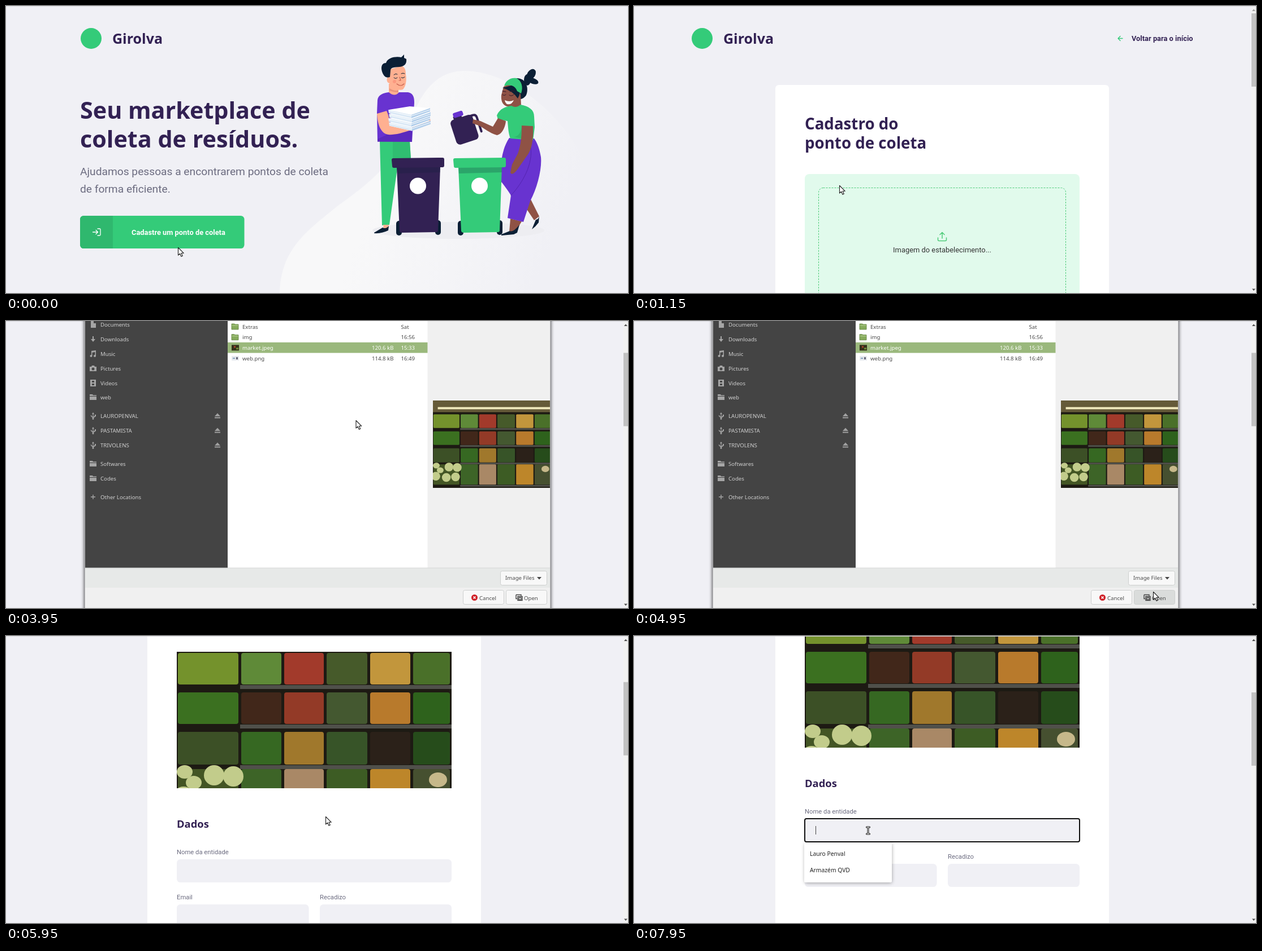
These frames come from a looping animation (1100 px wide and 509 px high, 8000 ms). An HTML page:

```html
<!DOCTYPE html>
<html lang="pt">
<head>
<meta charset="utf-8">
<title>Cadastro de ponto de coleta</title>
<style>
html, body { margin: 0; width: 100%; height: 100%; overflow: hidden; background: #f0f0f5; }
#stage { display: block; font-family: Roboto, sans-serif; }
.head { font-family: "Open Sans", sans-serif; font-weight: 700; fill: #322153; }
.ui { font-family: "Noto Sans", sans-serif; font-size: 9.65px; fill: #4a4a4a; }
.bold { font-weight: 700; }
.label { font-size: 11.25px; fill: #6c6c80; }
.line { fill: none; stroke-linecap: round; stroke-linejoin: round; }
.navy { fill: #0b1f35; } .dark { fill: #322153; } .green { fill: #34cb79; } .shade { fill: #2fb86e; }
.purple { fill: #6833d0; } .skin { fill: #ffb091; } .brown { fill: #8f5245; } .field { fill: #f0f0f5; }
</style>
</head>
<body>
<svg id="stage" width="1100" height="509" viewBox="0 0 1100 509">
<defs>
  <linearGradient id="fade" gradientUnits="userSpaceOnUse" x1="690" y1="240" x2="990" y2="360">
    <stop offset="0" stop-color="#f8f8f9"/><stop offset=".55" stop-color="#f4f4f7"/><stop offset="1" stop-color="#f0f0f5"/>
  </linearGradient>
  <filter id="soft" x="-10%" y="-10%" width="120%" height="120%"><feGaussianBlur stdDeviation="3"/></filter>
  <g id="photo"></g>
  <g id="bin">
    <rect x="8" y="112" width="10" height="26" rx="5" class="navy"/><rect x="77" y="111" width="10" height="26" rx="5" class="navy"/>
    <path d="M9 17L86 16L82 129Q82 132 79 132L18 133Q15 133 14 130Z"/>
    <path d="M9 17L86 16V26L10 28Z" fill="#0b1f35" fill-opacity=".22"/>
    <path d="M3 1L90 0Q93 0 93 3V14Q93 17 90 17L4 18Q1 18 1 15L0 4Q0 1 3 1Z"/>
    <circle cx="46.5" cy="50" r="14.5" fill="#fff"/>
  </g>
</defs>

<rect width="1100" height="509" class="field"/>

<g id="home">
  <path d="M484 509C486 432 530 400 590 352C660 302 690 270 715 205C735 150 762 115 812 115C880 116 960 170 1010 250C1050 320 1050 420 1030 509Z" fill="url(#fade)"/>
  <ellipse cx="800" cy="398" rx="152" ry="15" fill="#ededf1"/>
  <circle cx="150.5" cy="57.5" r="18.5" class="green"/>
  <text x="188" y="67" class="head" font-size="25">Girolva</text>
  <g class="head" font-size="41.3"><text x="131" y="200">Seu marketplace de</text><text x="131" y="251">coleta de resíduos.</text></g>
  <g font-size="19.2" fill="#6c6c80"><text x="131" y="300">Ajudamos pessoas a encontrarem pontos de coleta</text><text x="131" y="331">de forma eficiente.</text></g>
  <rect x="131" y="372" width="290.5" height="58" rx="6.4" class="green"/>
  <path d="M189 372H137.4A6.4 6.4 0 0 0 131 378.4V423.6A6.4 6.4 0 0 0 137.4 430H189Z" class="shade"/>
  <path class="line" stroke="#fff" stroke-width="1.3" d="M162 395H165.5Q167 395 167 396.5V405.5Q167 407 165.5 407H162M159 397.5L162.5 401L159 404.5M153.5 401H162.5"/>
  <text x="222" y="405.5" font-size="12.85" class="bold" fill="#fff">Cadastre um ponto de coleta</text>

  <!-- man -->
  <path class="green" d="M661 239H714L716 272L692 288L678 388L665 389Z"/>
  <path class="shade" d="M684 240H714L716 270H684Z" opacity=".7"/>
  <path class="skin" d="M667 388H677L676 394L668 396Z"/>
  <path class="navy" d="M651 402L666 393Q672 396 677 390L676 398Q664 404 651 403Z"/>
  <path class="skin" d="M677 138H694V156Q686 162 677 155Z"/>
  <path fill="#e8957c" d="M678 146Q688 152 694 149V153Q685 153 678 150Z"/>
  <path class="purple" d="M656 190L657 167C658 157 668 154 677 153C684 159 690 159 695 153L711 153C721 155 722 163 722 172L718 241L657 240Z"/>
  <path fill="#5626b5" d="M678 180L680 209L718 214V241H657V236L672 229Z" opacity=".7"/>
  <path class="skin" d="M676 113L700 106C706 109 707 114 707 121C709 132 707 143 702 148C692 151 681 146 678 137C672 136 672 125 678 125Z"/>
  <path class="navy" d="M669 124C662 114 662 101 672 101C675 91 690 89 699 91L704 86V92L708 94C709 102 705 107 696 108C687 109 681 108 680 114L679 126Q672 128 669 124Z"/>
  <path class="line" stroke="#0b1f35" d="M686 127Q689 130 692 127M699 127Q702 129 705 126M686 122Q689 119 692 121M699 120Q702 118 705 120"/>
  <path class="line" stroke="#c25b4c" stroke-width="1.1" d="M691 138Q698 144 704 138M696 126L698 132H695"/>
  <circle cx="687" cy="134" r="3" fill="#f98b75" opacity=".6"/>
  <path class="skin" d="M656 191L673 186C678 196 678 205 679 211L716 213L742 200L750 199L751 205L747 209L718 219C700 226 685 229 676 228C661 226 657 206 656 191Z"/>
  <g id="towels"></g>
  <!-- jug -->
  <g transform="rotate(-18 812 218)">
    <path class="line" stroke="#322153" stroke-width="4" d="M826 199H832Q838 199 838 205V231"/>
    <rect x="790" y="196" width="41" height="46" rx="7" class="dark"/>
    <rect x="798" y="191" width="15" height="6" class="dark"/><rect x="799" y="185" width="18" height="9" rx="3" class="purple"/>
  </g>
  <!-- woman -->
  <path class="brown" d="M928 343L943 373L934 380L918 356Z"/>
  <path class="navy" d="M930 396L937 379Q942 379 943 372L942 384Q937 391 930 396Z"/>
  <path class="brown" d="M892 377L912 382L902 399L890 401Z"/>
  <path class="navy" d="M876 405L891 399Q897 402 908 388L904 402L898 405L876 407Z"/>
  <path class="purple" d="M890 234C876 255 873 285 876 312C884 322 889 329 893 336L887 376L915 383L927 346C940 322 948 288 946 268C943 251 939 242 934 235Z"/>
  <path class="line" stroke="#5424b0" d="M928 250C932 280 915 312 893 336"/>
  <g class="navy">
    <ellipse cx="929" cy="121" rx="7" ry="10" transform="rotate(32 929 121)"/>
    <ellipse cx="932" cy="133" rx="10" ry="5" transform="rotate(20 932 133)"/>
    <ellipse cx="922" cy="131" rx="6" ry="10"/>
    <path d="M903 128C920 128 925 145 920 158C915 166 907 167 904 162Z"/>
  </g>
  <path class="brown" d="M895 164L910 156L911 177Q902 184 892 178Z"/>
  <path class="brown" d="M880 143C888 138 902 137 909 146C911 162 905 176 893 179C879 179 875 170 876 158Z"/>
  <path class="navy" d="M878 145C890 143 901 136 907 145Q911 155 905 164Q897 151 878 145Z"/>
  <path class="green" d="M881 142C883 133 892 126 903 128C912 133 915 144 911 155L904 151C900 140 890 139 881 142Z"/>
  <path class="line" stroke="#33182a" d="M878 157Q881 160 884 157M890 158Q894 161 898 157M878 151L884 152M891 152Q895 149 899 151"/>
  <path fill="#fff" d="M882 167Q890 171 898 167Q894 176 886 174Q883 172 882 167Z"/>
  <path class="green" d="M868 194C873 182 884 178 894 177Q902 182 910 175C925 178 934 184 934 196L935 215L932 238L892 235C888 224 888 214 887 204L870 201Z"/>
  <path class="brown" d="M870 199L884 204C883 215 877 228 868 229C856 226 846 217 836 212L825 208L826 201L839 204L861 214Z"/>
  <path class="shade" d="M898 232C908 232 912 220 912 211L916 236Z"/>
  <path class="brown" d="M912 212L932 213C933 236 930 255 921 266L905 289C899 298 893 300 892 295L895 281L905 262C911 245 912 230 912 212Z"/>
  <use href="#bin" x="682" y="269" class="dark"/>
  <use href="#bin" x="791" y="269" class="green"/>
</g>

<g id="form">
  <g id="page">
    <circle cx="120.5" cy="57.5" r="18.5" class="green"/>
    <text x="158" y="67" class="head" font-size="25">Girolva</text>
    <path class="line" stroke="#34cb79" stroke-width="1.3" d="M864 57.5H856M860 53.5L856 57.5L860 61.5"/>
    <text x="880" y="62" font-size="12.85" class="bold" fill="#322153">Voltar para o início</text>
    <rect x="250" y="140" width="590" height="900" rx="6.4" fill="#fff"/>
    <g class="head" font-size="27.7"><text x="302" y="219">Cadastro do</text><text x="302" y="253">ponto de coleta</text></g>
    <g id="drop">
      <rect x="302" y="298" width="486" height="242" rx="8" fill="#e1faec"/>
      <rect x="326.5" y="322.5" width="437" height="194" rx="8" fill="none" stroke="#4ecb79" stroke-dasharray="3 2"/>
      <path class="line" stroke="#4ecb79" stroke-width="1.5" d="M537.5 411V414.5Q537.5 416.5 539.5 416.5H550.5Q552.5 416.5 552.5 414.5V411M541 405.5L545 401.5L549 405.5M545 402V412"/>
      <text x="545" y="437" font-size="12.9" fill="#333" text-anchor="middle">Imagem do estabelecimento...</text>
    </g>
    <svg id="shot" x="302" y="298" width="486" height="242" viewBox="0 0 486 242"><use href="#photo"/></svg>
    <text x="302" y="610" class="head" font-size="18.4">Dados</text>
    <g class="label"><text x="302" y="657">Nome da entidade</text><text x="302" y="737">Email</text><text x="555" y="737">Recadizo</text></g>
    <g class="field"><rect x="302" y="666" width="486" height="41" rx="6.4"/><rect x="302" y="746" width="233.5" height="41" rx="6.4"/><rect x="555" y="746" width="233" height="41" rx="6.4"/></g>
    <g id="focus">
      <rect x="302" y="666" width="486" height="41" rx="3" fill="none" stroke="#101010" stroke-width="2"/>
      <rect x="302" y="710" width="154" height="70" rx="3" opacity=".35" filter="url(#soft)"/>
      <rect x="301" y="708.5" width="155" height="70.5" rx="2" fill="#fff"/>
      <g class="ui" style="font-size:10.3px;fill:#222"><text x="311" y="732">Lauro Penval</text><text x="311" y="761">Armazém QVD</text></g>
      <rect id="caret" x="321" y="679" width="1" height="15" fill="#444"/>
    </g>
  </g>
  <rect x="1092" width="8" height="509" fill="#f1f1f1"/>
  <rect id="thumb" x="1092" y="13" width="8" height="130" fill="#c1c1c1"/>
  <path id="up" d="M1093 9L1096 5.5L1099 9Z" fill="#505050"/><path d="M1093 501.5L1096 505L1099 501.5Z" fill="#505050"/>
</g>
<rect width="1100" height="1" fill="#dcdce1"/>

<g id="dialog"></g>

<g id="cursor" class="line">
  <path id="arrow" fill="#fff" stroke="#1a1a1a" stroke-width="1.1" d="M.5 .5V14L3.6 11.2L5.9 16.3L8.2 15.3L6 10.3H10.3Z"/>
  <path id="hand" fill="#fff" stroke="#1a1a1a" stroke-width="1.1" d="M0 11V1.5Q0 0 1.3 0T2.6 1.5V7Q5 5.5 5.5 7.5Q8 6.5 8 8.5Q10 8 10 10V13Q9.5 15 8.5 17H1Q-1 14-4 11Q-4.5 9-2.5 9Z"/>
  <g id="beam"><path d="M-2.5-6H2.5M-2.5 6H2.5M0-6V6" stroke="#1a1a1a" stroke-width="3"/><path d="M-2.5-6H2.5M-2.5 6H2.5M0-6V6" stroke="#eee"/></g>
</g>
</svg>

<script>
const $ = id => document.getElementById(id);
const rect = (x, y, w, h, fill, more = '') => `<rect x="${x}" y="${y}" width="${w}" height="${h}" fill="${fill}" ${more}/>`;
const ui = (x, y, s, more = '') => `<text class="ui" x="${x}" y="${y}" ${more}>${s}</text>`;
const draw = (x, y, d, color, more = '') => `<path transform="translate(${x} ${y})" d="${d}" fill="${color}" ${more}/>`;

// Stack of folded towels, bottom one first
$('towels').innerHTML = [3, 2, 1, 0].map(i => `<g transform="translate(${i % 2} ${i * 7.5})">
  <path d="M677 184L714 178L750 181L717 193V199L677 190Z" fill="#fff"/>
  <path d="M676 184L717 193V199L677 190Z" fill="#dbe9f6"/>
  <path d="M717 193L750 181V187L717 199Z" fill="#b3cfeb"/>
  <path d="M677 186L717 195L750 184" fill="none" stroke="#fff"/></g>`).join('');

// Market shelves in flat tones
const cols = [0, 112, 188, 263, 340, 416, 486];
const shelves = [
  [2, 56, '#74922c #5f8a38 #a23a2b #465a2a #c2963c #4a7029'],
  [72, 56, '#3b7020 #41271a #933a27 #445830 #b87a2c #2e621c'],
  [142, 58, '#3c5026 #366822 #a0782c #375428 #2b2119 #264c1b'],
  [208, 84, '#435524 #3d6427 #a98866 #3d5c24 #bd862a #465030']
];
$('photo').innerHTML = rect(0, -55, 486, 360, '#1d1a13') + rect(0, -55, 486, 48, '#655a38') + rect(20, -28, 466, 9, '#f1e9bd') +
  shelves.map(([y, h, tones]) => tones.split(' ').map((c, i) =>
    rect(cols[i] + 2, y, cols[i + 1] - cols[i] - 5, h, c, 'rx="4"')).join('') +
    rect(cols[1], y + h + 1, 374, 7, '#50504a')).join('') +
  [[14, 213], [30, 232], [66, 219], [100, 221], [12, 257], [55, 262], [93, 260]].map(([x, y], i) =>
    `<ellipse cx="${x}" cy="${y}" rx="${i > 1 ? 18 : 14}" ry="${i > 1 ? 18 : 12}" fill="#c2cc8b"/>`).join('') +
  '<ellipse cx="462" cy="227" rx="16" ry="13" fill="#c6b88a"/>';

// File chooser
const icons = {
  doc: 'M-4-6H1L5-2V6H-4ZM1-6V-2H5',
  down: 'M-1-5H1V0H4L0 5L-4 0H-1Z',
  music: 'M-3-5L5-6V4A2 2 0 1 1 3.5 2V-3L-1.5-2V4A2 2 0 1 1-3 2Z',
  camera: 'M-6-3H-3L-2-5H2L3-3H6V5H-6ZM0-1.5A2.5 2.5 0 1 0 .01-1.5Z',
  film: 'M-5-6H5V6H-5ZM-2-4V-1H2V-4ZM-2 1V4H2V1Z',
  folder: 'M-6-5H-1L0-3.5H6V-2H-6ZM-6-1H6V5H-6Z',
  usb: 'M0-6L2-3H.6V2L3 0V-2H5V1L.6 4A1.5 1.5 0 1 1-.6 4L-4 1V-1H-3V0L-.6 2V-3H-2Z',
  plus: 'M-.7-4H.7V-.7H4V.7H.7V4H-.7V.7H-4V-.7H-.7Z'
};
const places = [
  ['doc', 'Documents', 6], ['down', 'Downloads', 32], ['music', 'Music', 58], ['camera', 'Pictures', 84],
  ['film', 'Videos', 110], ['folder', 'web', 135], ['usb', 'LAUROPENVAL', 168], ['usb', 'PASTAMISTA', 194],
  ['usb', 'TRIVOLENS', 220], ['folder', 'Softwares', 253], ['folder', 'Codes', 279], ['plus', 'Other Locations', 312]
];
const files = [['Extras', '', 'Sat'], ['img', '', '16:56'], ['market.jpeg', '120.6 kB', '15:33'], ['web.png', '114.8 kB', '16:49']];

const fileIcon = (i, y) => i < 2
  ? draw(405, y, 'M-6-5H-1L0-4H6V5H-6Z', '#86ab5c', 'stroke="#5f7f3d" stroke-width=".8"') + rect(399.5, y - 2.5, 11, 1, '#b8d196')
  : i < 3 ? rect(399, y - 5, 13, 10, '#33301b') + rect(403, y - 3, 3, 3, '#a5452b') + rect(407, y, 4, 3, '#6f8b36')
  : rect(399, y - 4, 13, 8, '#e6e9ee') + rect(401, y - 1, 4, 2, '#8aa6c0') + rect(407, y - 2, 3, 4, '#667');

const list = (id, chosen, edge) => `<g id="${id}">` + rect(392, 0, edge - 392, 438, '#fff') + files.map(([name, size, date], i) => {
  const y = 10 + 18.7 * i, tint = i === chosen ? 'style="fill:#fff"' : '';
  return (tint && rect(392, y - 9.5, edge - 392, 18.7, '#9ab87c')) + fileIcon(i, y) + ui(418, y + 3.5, name, tint) +
    ui(edge - 60, y + 3.5, size, tint + ' text-anchor="end"') + ui(edge - 47, y + 3.5, date, tint);
}).join('') + '</g>';

const button = (x, y, w, id = '') => rect(x + .5, y + .5, w - 1, 25, '#f8f8f8', `rx="3" stroke="#cdcfce" ${id && `id="${id}"`}`);

$('dialog').innerHTML = rect(139, -20, 824, 560, '#000', 'filter="url(#soft)" opacity=".85"') +
  rect(139.5, 0, 823, 509, '#f0f0f0') + rect(140, 0, 252, 438, '#444') +
  places.map(([icon, name, y]) => draw(154, y, icons[icon], '#a6a6a6', 'fill-rule="evenodd"') + ui(167, y + 3.5, name, 'style="fill:#d0d0d0"') +
    (icon === 'usb' ? draw(374, y, 'M0-4.5L5 1H-5ZM-5 2.5H5V4.5H-5Z', '#a0a0a0') : '')).join('') +
  list('wide', 0, 962) + list('narrow', 2, 745.5) +
  `<svg id="preview" x="755" y="141" width="207" height="155" viewBox="0 -55 481 360"><use href="#photo"/></svg>` +
  rect(140, 438, 822, 35, '#e7e9e8') + rect(140, 437.5, 822, 1, '#d6d8d7') +
  button(874, 443, 83) + ui(883, 459, 'Image Files') + draw(943, 456, 'M-4-2H4L0 2.5Z', '#444') +
  button(808, 477, 73) + '<circle cx="828.5" cy="490.5" r="5.5" fill="#cf2027"/>' +
  draw(828.5, 490.5, 'M-2-2L2 2M2-2L-2 2', 'none', 'stroke="#fff" stroke-width="1.5"') + ui(837, 494.5, 'Cancel') +
  button(884, 477, 73, 'open') + draw(908, 490.5, 'M-6-5H3V-3M-6-5V2H-4M-3-2H5V5H-3ZM-1 0H3V4H-1Z', 'none', 'stroke="#444" stroke-width="1.4"') + ui(916, 494.5, 'Open');

// Time, x, y, shape
const moves = [
  [0, 304, 428, 'arrow'], [50, 298, 418, 'hand'], [650, 298, 418, 'arrow'],
  ...Array.from({ length: 6 }, (_, i) => [900 + 50 * i, 298 + 65 * (i + 1) / 6, 418 - 100 * (i + 1) / 6, 'arrow']),
  [2900, 546, 246, 'arrow'], [3200, 522, 140, 'arrow'], [3300, 507, 68, 'arrow'], [3450, 494, 56, 'arrow'],
  [3550, 483, 47, 'arrow'], [3950, 618.5, 176, 'arrow'], [4100, 752, 322, 'arrow'], [4200, 866, 438, 'arrow'],
  [4500, 929, 451, 'arrow'], [4700, 918, 480, 'arrow'], [5200, 866, 449, 'arrow'], [5400, 712, 343, 'arrow'],
  [5550, 683, 319, 'arrow'], [5750, 640, 314, 'arrow'], [5950, 565, 320, 'arrow'], [6150, 490, 331, 'beam'],
  [6350, 441, 335, 'beam'], [6500, 425, 341, 'beam'], [6600, 414, 345, 'beam']
];
const scrolls = [[0, 0], [2900, 171], [5950, 270], [6150, 342]];
const spans = {
  home: [0, 650], form: [650, 8000], dialog: [2900, 5200], wide: [2900, 3950], narrow: [3950, 5200], preview: [3950, 5200],
  drop: [650, 5200], shot: [5200, 8000], focus: [6800, 8000]
};
const latest = (table, t) => table.findLast(row => row[0] <= t);
const show = (id, on) => $(id).setAttribute('display', on ? 'inline' : 'none');

function render(t) {
  for (const [id, [from, to]] of Object.entries(spans)) show(id, t >= from && t < to);
  show('caret', t < 7550 || t >= 7950);
  $('open').setAttribute('fill', t >= 4950 ? '#dadcdb' : '#f8f8f8');
  const scroll = latest(scrolls, t)[1];
  $('page').setAttribute('transform', `translate(0 ${-scroll})`);
  $('thumb').setAttribute('y', 13 + scroll * .2545);
  $('up').setAttribute('opacity', scroll ? 1 : .5);
  const [, x, y, shape] = latest(moves, t);
  $('cursor').setAttribute('transform', `translate(${x} ${y})`);
  for (const id of ['arrow', 'hand', 'beam']) show(id, id === shape);
}

const start = performance.now();
function tick() {
  render((performance.now() - start) % 8000);
  requestAnimationFrame(tick);
}
tick();
</script>
</body>
</html>
```
